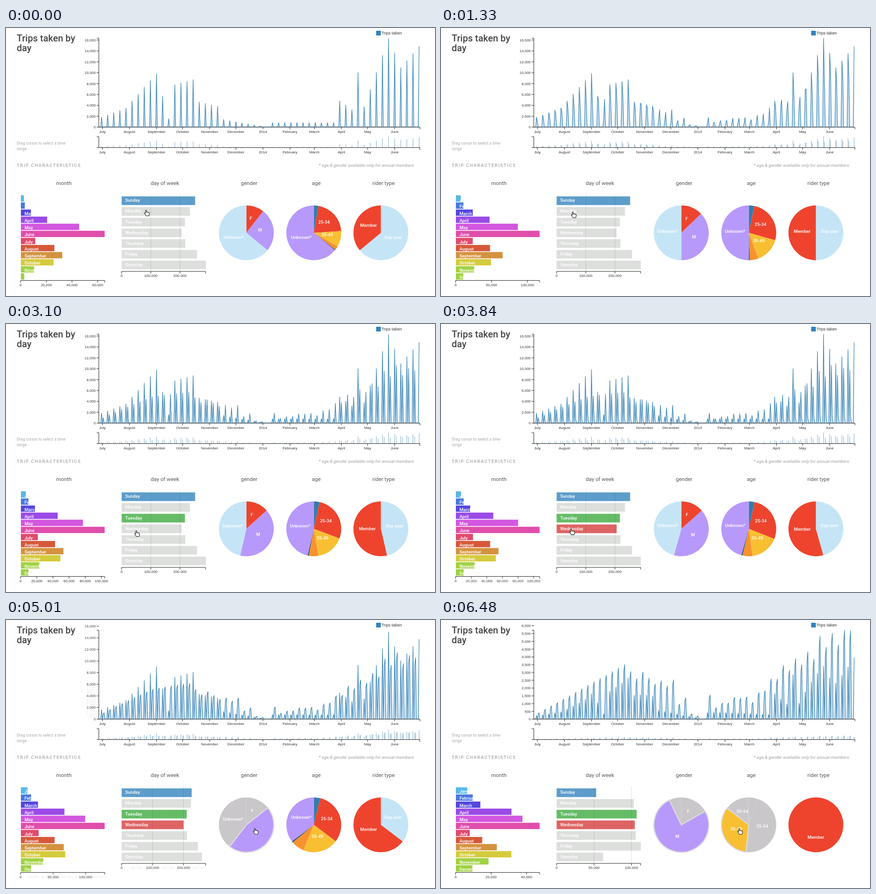
These frames come from a looping animation (922x577 px, 6630 ms). An HTML page:

```html
<!DOCTYPE html>
<html lang="en">
<head>
<meta charset="utf-8">
<title>Trips taken by day</title>
<style>
html, body { margin: 0; width: 100%; height: 100%; overflow: hidden; background: #fff; }
svg { display: block; width: 922px; height: 577px; }
text { font-family: Roboto, sans-serif; }
.tick { font: 7.9px "Liberation Sans", Arial, sans-serif; fill: #333; }
.head { font-size: 11.5px; fill: #555; text-anchor: middle; }
.label { font-size: 9.6px; font-weight: 500; fill: #fff; }
.ghost { fill: #888; opacity: .1; }
.axis { fill: none; stroke: #222; stroke-width: 1; }
.mid { text-anchor: middle; }
.end { text-anchor: end; }
</style>
</head>
<body>
<svg viewBox="0 0 922 577">
  <rect width="922" height="577" fill="#fff"/>
  <g fill="#444" font-size="20" font-weight="500">
    <text x="23" y="29">Trips taken by</text>
    <text x="23" y="49.5">day</text>
  </g>
  <g fill="#a8a8a8" font-size="8.56">
    <text x="23" y="250.5">Drag cursor to select a time</text>
    <text x="23" y="262.5">range</text>
  </g>
  <text x="23" y="299" fill="#a4a4a4" font-size="9.5" font-weight="500" letter-spacing="1.6">TRIP CHARACTERISTICS</text>
  <text x="877" y="298.5" class="end" fill="#a0a0a0" font-size="9.6" font-style="italic">* age &amp; gender available only for annual members</text>
  <text x="124.5" y="338" class="head">month</text>
  <text x="341.5" y="338" class="head">day of week</text>
  <text x="522.5" y="338" class="head">gender</text>
  <text x="667" y="338" class="head">age</text>
  <text x="811.5" y="338" class="head">rider type</text>
  <rect x="795.5" y="6" width="10" height="10" fill="#3182bd"/>
  <text x="807" y="14.3" class="tick" style="font-size:8.9px">Trips taken</text>
  <g id="scene"></g>
  <path id="hand" fill="#fff" stroke="#222" stroke-width="1.1" stroke-linejoin="round"
    d="M-3.2-5C-3.2-6.4-1.2-6.4-1.2-5V-1.5C-.9-2.4 1-2.2 1-1.1C1.3-1.9 3-1.6 3-.5C3.4-1.2 5-.8 5 .4V3C5 4.5 4 5 4 6.5H-2.2C-2.4 4.5-5 2.5-5.4 .8C-5.6-.4-4.2-.4-3.2 1Z"/>
</svg>
<script>
const LOOP = 6630, STEP = LOOP / 45, DAYS = 368;
const scene = document.getElementById('scene');
const hand = document.getElementById('hand');
const lerp = (a, b, p) => a + (b - a) * p;
const mix = (a, b, p) => a.map((v, i) => lerp(v, b[i], p));
const clamp = v => Math.max(0, Math.min(1, v));
const ease = k => k < .5 ? 4 * k ** 3 : 1 - 4 * (1 - k) ** 3;
const slow = k => k * k;
const num = v => +v.toFixed(2);
const comma = v => String(v).replace(/\B(?=(\d{3})+$)/g, ',');
const dayX = i => 199.7 + 1.875 * i;
const dateOf = i => new Date(Date.UTC(2013, 5, 27 + i));

// Finds the segment of key points around t and how far t is along it.
function segment(points, t) {
  let i = 0;
  while (i < points.length - 2 && points[i + 1][0] <= t) i++;
  const [a, b] = [points[i], points[i + 1]];
  return [a, b, clamp((t - a[0]) / (b[0] - a[0]))];
}
const curve = points => w => {
  const [a, b, k] = segment(points, w);
  return lerp(a[1], b[1], k);
};

// Trips per day over the weeks: leisure on Sundays, commuting on weekdays.
const sunday = curve([[0, 1800], [4, 3500], [9, 9850], [11, 1550], [12, 7800], [15, 8700],
  [16, 4600], [19, 3850], [20, 1400], [24, 500], [27, 0], [28, 800], [38, 800], [39, 4800],
  [41, 3200], [42, 10000], [43, 3750], [47, 16300], [49, 10900], [52, 14800]]);
const commute = curve([[0, 450], [14, 4050], [16, 3000], [17, 3500], [19, 2600], [22, 2700],
  [23, 1200], [24, 1450], [25, 400], [27, 0], [28, 1650], [29, 900], [33, 1700], [35, 1350],
  [40, 3700], [45, 4850], [46, 5700], [50, 6100], [51, 7150]]);
const share = curve([[0, .41], [8, .46], [17, .72], [30, .88], [40, .68], [48, .53], [52, .62]]);
const menWed = w => commute(w) * (w < 20 ? 1 : w % 2 ? .92 : 1.08);
const weekday = w => menWed(w) / share(w);
const ALL = [sunday, w => weekday(w) * .85, w => weekday(w) * .88, weekday];
const MEN = [w => sunday(w) * share(w) ** 2 * .8, 0, w => menWed(w) * .86, menWed];

// The first Sunday is day 3.
const daily = (rates, days, scale = 1) => Array.from({ length: DAYS }, (_, i) => {
  const d = (i + 4) % 7, w = (i - 3 - d) / 7;
  return w >= 0 && days.includes(d) ? rates[d](w) * scale : 0;
});

function monthBars(trips) {
  const sums = Array(12).fill(0);
  trips.forEach((v, i) => sums[dateOf(i).getUTCMonth()] += v);
  const max = Math.max(...sums);
  return sums.map(v => v / max * 180);
}

// Cumulative pie shares from the share of members m; casual riders skew young.
const skew = m => (1 - m) ** 3;
const genders = m => [m * (.22 + .28 * skew(m)), m, 1];
const ages = m => [.053 + .09 * skew(m), .516 + .57 * skew(m), .855 + .265 * skew(m), .989, 1, 1 / m].map(v => v * m);

const everyone = (days, m, mMax, mStep) => {
  const trips = daily(ALL, days);
  return { days, trips, month: monthBars(trips), mMax, mStep, yMax: 16333, yStep: 2000, yTop: 16000,
    day: [158, 147, 136, 129, 137, 162, 181], dMax: 288000, dStep: 100000,
    gender: genders(m), age: ages(m), rider: [1 - m, 1] };
};
const men = (scale, yMax, mMax, dMax, sun, sat, gender) => {
  const days = [0, 2, 3], trips = daily(MEN, days, scale);
  return { days, trips, month: monthBars(trips), mMax, mStep: 20000, yMax, yStep: 500, yTop: 6000,
    day: [sun, 166, 172, 168, 170, 181, sat], dMax, dStep: 50000,
    gender, age: ages(1), rider: [0, 1] };
};

const onlySun = everyone([0], .36, 65400, 20000);
// Click time, state reached, duration, easing.
const clicks = [
  [0, onlySun],
  [290, everyone([0, 1], .5, 117000, 50000)],
  [1320, onlySun],
  [2500, everyone([0, 2], .536, 104000, 20000)],
  [3680, everyone([0, 2, 3], .604, 137600, 50000)],
  [4860, men(1, 6680, 59900, 132500, 88, 103, genders(.604))],
  [6270, men(.865, 5716, 47400, 112200, 85, 100, [.167, .928, 1]), 210, slow]
];
const moves = [[290, 303, 398], [1030, 286, 401], [1630, 285, 403], [1915, 284, 424], [2810, 284, 422],
  [3094, 282, 451], [3990, 282, 447], [4272, 536, 443], [5160, 537, 455], [5598, 644, 450],
  [5890, 643, 455]];

const monthNames = ['January', 'February', 'March', 'April', 'May', 'June', 'July', 'August',
  'September', 'October', 'November', 'December'];
const monthFill = ['#57b8e6', '#4a78e0', '#5546e0', '#9a4be6', '#d357e0', '#e04eac', '#e04a6e',
  '#d6583a', '#d4923f', '#d4cb3c', '#a2d146', '#9ed142'];
const dayNames = ['Sunday', 'Monday', 'Tuesday', 'Wednesday', 'Thursday', 'Friday', 'Saturday'];
const dayFill = ['#5d9dca', '#ffa556', '#66bc66', '#de6464'];
const RED = '#ee442e', SKY = '#c5e5f7', VIOLET = '#b799fb', OFF = '#c9c7c9';

const text = (x, y, s, cls) => `<text x="${num(x)}" y="${num(y)}" class="${cls}">${s}</text>`;
const line = d => `<path class="axis" d="${d}"/>`;

// Ticks of both scales cross-fade when the step changes.
function ticks(a, b, key, p, draw) {
  const set = (s, o) => {
    let out = '';
    for (let v = 0; v <= 300000; v += s[key]) out += draw(v, s);
    return `<g opacity="${num(o)}">${out}</g>`;
  };
  return a[key] === b[key] ? set(b, 1) : set(a, 1 - p) + set(b, p);
}

function timeAxis(y) {
  let out = line(`M200 ${y}H889.5v4.5`);
  for (let i = 0; i < DAYS; i++) {
    const date = dateOf(i), m = date.getUTCMonth();
    if (date.getUTCDate() !== 1) continue;
    out += line(`M${num(dayX(i))} ${y}v4.5`) +
      text(dayX(i), y + 12.6, m ? monthNames[m] : '2014', 'tick mid');
  }
  return out;
}

function lineChart(a, b, p, trips) {
  const k = 191.5 / lerp(a.yMax, b.yMax, p);
  const pts = trips.map((v, i) => `${num(dayX(i))} ${num(213 - v * k)}`).join('L');
  let mini = '';
  trips.forEach((v, i) => {
    if (v > 20) mini += `M${num(dayX(i))} 257v${num(-v * 23.5 / 16333)}`;
  });
  return `<path d="M${pts}V213H200Z" fill="#c6dff0"/>` +
    `<path d="M${pts}" fill="none" stroke="#3a84b7" stroke-width="1.2"/>` +
    `<path d="${mini}" fill="none" stroke="#6c9fc2" stroke-width=".9"/>` +
    line('M195 22H199.5V213.5H195') + timeAxis(213.5) +
    line('M195 234H199.5V257.5H195') + timeAxis(257.5) +
    ticks(a, b, 'yStep', p, (v, s) => {
      const y = 213.5 - v * k;
      if (v > s.yTop || y < 5) return '';
      return line(`M195 ${num(y)}h5`) + text(193, y + 2.8, comma(v), 'tick end');
    });
}

// Horizontal bars with white labels; parts outside a bar stay barely visible.
function bars(x, y, pitch, h, widths, names, fill) {
  return widths.map((w, i) => {
    const top = y + i * pitch, label = cls => text(x + 7.7, top + 11.9, names[i], cls);
    return label('label ghost') +
      `<rect x="${x}" y="${num(top)}" width="${num(w)}" height="${h}" fill="${fill(i)}"/>` +
      label('label');
  }).join('');
}

function barAxis(x, y, a, b, p, name) {
  const max = lerp(a[name + 'Max'], b[name + 'Max'], p);
  return line(`M${x} ${y + 4.5}V${y}h180.5v4.5`) + ticks(a, b, name + 'Step', p, v => {
    if (v > max) return '';
    const tx = x + v / max * 180.5;
    const grid = name === 'd' && v ? `<path d="M${num(tx)} 358V${y}" stroke="#000" opacity=".12"/>` : '';
    return grid + line(`M${num(tx)} ${y}v4.5`) + text(tx, y + 12.3, comma(v), 'tick mid');
  });
}

function pie(cx, ends, names, fills, picked = -1) {
  const cy = 441, r = 59;
  const at = (f, q) => {
    const g = f * 2 * Math.PI;
    return [num(cx + q * Math.sin(g)), num(cy - q * Math.cos(g))];
  };
  let out = '', front = '', labels = '', from = 0;
  ends.forEach((to, i) => {
    const size = to - from, start = from;
    from = to;
    if (size < .0005) return;
    const fill = picked < 0 || picked === i ? fills[i] : OFF;
    const d = `M${cx} ${cy}L${at(start, r)}A${r} ${r} 0 ${+(size > .5)} 1 ${at(to, r)}Z`;
    if (size > .999) out += `<circle cx="${cx}" cy="${cy}" r="${r}" fill="${fill}"/>`;
    else if (picked === i) front = `<path d="${d}" fill="${fill}" stroke="#dcdadd" stroke-width="2.5"/>`;
    else out += `<path d="${d}" fill="${fill}"/>`;
    if (size > .08) labels += text(...at((start + to) / 2, r / 2), names[i], 'label mid');
  });
  return out + front + labels;
}

function moveHand(t) {
  const [[, x0, y0], [, x1, y1], k] = segment(moves, t);
  hand.setAttribute('transform', `translate(${num(lerp(x0, x1, ease(k)))} ${num(lerp(y0, y1, ease(k)))})`);
}

function draw(t) {
  let i = clicks.length - 1;
  while (clicks[i][0] > t) i--;
  const [start, b, span = 500, easing = ease] = clicks[i];
  const a = i ? clicks[i - 1][1] : b;
  const p = easing(clamp((t - start) / span));
  const part = key => mix(a[key], b[key], p);
  scene.innerHTML = lineChart(a, b, p, part('trips')) +
    bars(32, 360.3, 15.25, 13.6, part('month'), monthNames, m => monthFill[m]) +
    barAxis(31.5, 543.5, a, b, p, 'm') +
    bars(248.5, 362.5, 23.05, 18.7, part('day'), dayNames, d => b.days.includes(d) ? dayFill[d] : '#dddfdd') +
    barAxis(248.5, 524, a, b, p, 'd') +
    pie(516.5, part('gender'), ['F', 'M', 'Unknown*'], [RED, VIOLET, SKY], i >= 5 ? 1 : -1) +
    pie(661.5, part('age'), ['', '25-34', '35-49', '50-64', '', 'Unknown*'],
      ['#2f7fac', RED, '#f9bf33', '#f5932f', '#1f4a63', VIOLET], i >= 6 ? 2 : -1) +
    pie(805.7, part('rider'), ['Day user', 'Member'], [SKY, RED]);
  moveHand(t);
}

const begin = performance.now();
let shown = -1;
function tick() {
  const t = (performance.now() - begin) % LOOP;
  const n = Math.min(44, Math.floor((t + 10) / STEP));
  if (n !== shown) draw((shown = n) * STEP);
  requestAnimationFrame(tick);
}
tick();
</script>
</body>
</html>
```
